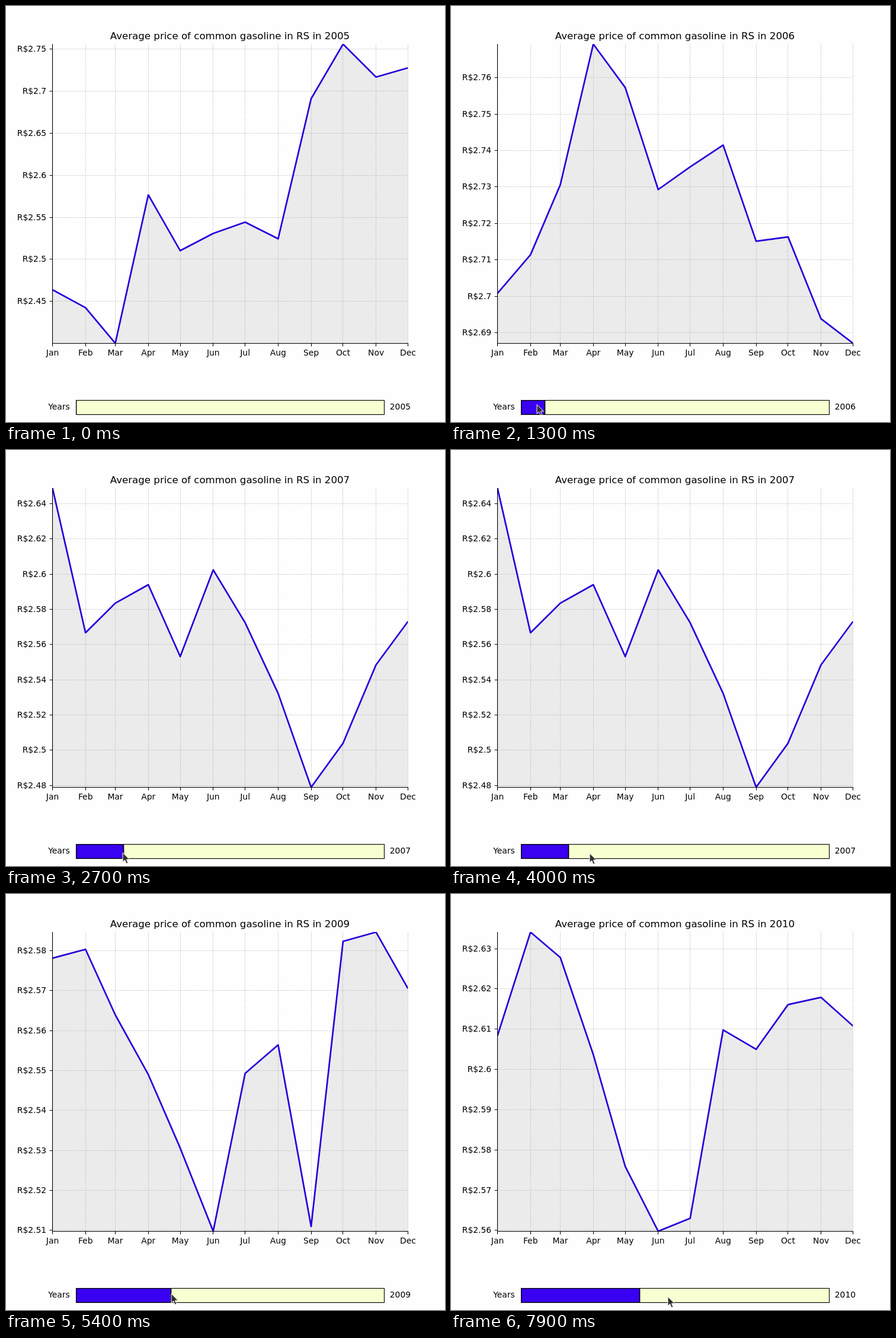
An HTML page that plays this animation: 741 by 701 pixels, repeating every 8 s.

```html
<!DOCTYPE html>
<html lang="en">
<head>
<meta charset="utf-8">
<title>Gasoline price by year</title>
<style>
html, body { margin: 0; width: 100%; height: 100%; overflow: hidden; background: #fefefe; }
svg { display: block; font: 13.89px "DejaVu Sans", sans-serif; }
.grid { stroke: #b0b0b0; stroke-width: 1.11; stroke-dasharray: 1.11 1.83; fill: none; }
.axis { stroke: #000; stroke-width: 1.11; fill: none; }
</style>
</head>
<body>
<svg width="741" height="701" viewBox="0 0 741 701">
  <clipPath id="plot"><rect x="78" y="64" width="600.5" height="504.5"/></clipPath>
  <clipPath id="track"><rect x="118" y="664" width="521" height="25"/></clipPath>
  <rect width="741" height="701" fill="#fefefe"/>
  <path id="area" fill="#ebebeb" clip-path="url(#plot)"/>
  <path id="grid" class="grid"/>
  <path id="line" fill="none" stroke="#2200dd" stroke-width="2.7" stroke-linejoin="round" clip-path="url(#plot)"/>
  <path id="axes" class="axis"/>
  <g id="months" text-anchor="middle"></g>
  <g id="prices" text-anchor="end"></g>
  <text id="title" x="378" y="56" font-size="16.62" text-anchor="middle"></text>
  <rect x="118.5" y="664.5" width="520" height="24" fill="#f8ffd0"/>
  <path id="fill" fill="#3900f2" stroke="#000" stroke-width="1.6" clip-path="url(#track)"/>
  <rect class="axis" x="118.5" y="664.5" width="520" height="24"/>
  <text x="107.8" y="680" text-anchor="end">Years</text>
  <text id="year" x="647.8" y="680"></text>
  <path id="cursor" d="M1 .6V16.2L4.6 12.9L7.2 19.1L9.9 17.9L7.4 12H12.5Z" fill="#2e2e2e" stroke="#fff"/>
</svg>
<script>
const el = id => document.getElementById(id);
const LOOP = 8000, STEP = 100, STEPS_PER_YEAR = 13.7, FIRST = 2005;
const LEFT = 78.5, WIDTH = 600, TOP = 64.3, BASE = 568.3;

const names = "Jan Feb Mar Apr May Jun Jul Aug Sep Oct Nov Dec".split(" ");
const day = m => Date.UTC(FIRST, m, 1) - Date.UTC(FIRST, 0, 1);
const xs = names.map((_, m) => LEFT + WIDTH * day(m) / day(11));
const snap = v => Math.floor(v) + 0.5;

// monthly prices in R$, one row per year
const prices = [
  [2.4638, 2.4426, 2.4003, 2.5766, 2.5103, 2.5308, 2.5442, 2.5244, 2.6909, 2.7557, 2.7166, 2.7275],
  [2.7008, 2.7114, 2.7306, 2.7692, 2.7573, 2.7293, 2.7355, 2.7415, 2.7151, 2.7163, 2.6938, 2.6871],
  [2.6488, 2.5667, 2.5835, 2.594, 2.5532, 2.6024, 2.5724, 2.5323, 2.479, 2.504, 2.5485, 2.5731],
  [2.5346, 2.4681, 2.551, 2.5636, 2.5633, 2.5742, 2.5955, 2.5923, 2.592, 2.5928, 2.5912, 2.5874],
  [2.5781, 2.5803, 2.5639, 2.549, 2.5306, 2.5098, 2.5493, 2.5564, 2.511, 2.5823, 2.5846, 2.5705],
  [2.6084, 2.6341, 2.6278, 2.6037, 2.5759, 2.5598, 2.563, 2.6098, 2.605, 2.6161, 2.6179, 2.6108]
];

// pointer moves: start time, steps, end x, end y, sag of the path
const start = { x: 103, y: 694 };
const moves = [
  [500, 6, 141, 668, -8],
  [1300, 1, 144, 671, 0],
  [1600, 6, 196, 678, 6],
  [3000, 2, 224, 682, 0],
  [3300, 5, 235, 679, 1],
  [4000, 1, 233, 679, 0],
  [4400, 3, 270, 675, 0],
  [4800, 2, 278, 673, 0],
  [5800, 4, 322, 678, 5],
  [7100, 1, 368, 679, 0],
  [7500, 1, 365, 678, 0]
];

const label = (x, y, s) => `<text x="${x}" y="${y}">${s}</text>`;

function drawChart(n) {
  const row = prices[n], low = Math.min(...row), high = Math.max(...row);
  const yOf = v => BASE - (v - low) / (high - low) * (BASE - TOP);
  const gap = [0.01, 0.02, 0.05].find(s => (high - low) / s < 9);
  const path = "M" + row.map((v, i) => `${xs[i]} ${yOf(v)}`).join("L");
  let grid = xs.map(x => `M${snap(x)} 568V64`).join("");
  let axes = "M78.5 64V569M78 568.5H679" + xs.map(x => `M${snap(x)} 568.5V573.4`).join("");
  let labels = "";
  for (let i = Math.ceil(low / gap); i * gap <= high; i++) {
    const y = snap(yOf(i * gap));
    grid += `M78 ${y}H678`;
    axes += `M78.5 ${y}H73.6`;
    labels += label(68.2, y + 4.5, "R$" + +(i * gap).toFixed(2));
  }
  el("line").setAttribute("d", path);
  el("area").setAttribute("d", path + `V${BASE}H${LEFT}Z`);
  el("grid").setAttribute("d", grid);
  el("axes").setAttribute("d", axes);
  el("fill").setAttribute("d", `M118.5 664.5h${40 * n}v24H118.5Z`);
  el("prices").innerHTML = labels;
  el("title").textContent = "Average price of common gasoline in RS in " + (FIRST + n);
  el("year").textContent = FIRST + n;
}

function drawCursor(t) {
  let { x, y } = start, sag = 0;
  for (const [at, steps, toX, toY, bend] of moves) {
    if (t < at) break;
    const p = Math.min(1, (Math.floor((t - at) / STEP) + 1) / steps);
    x += (toX - x) * p;
    y += (toY - y) * p;
    sag = bend * Math.sin(Math.PI * p);
  }
  el("cursor").style.display = t < moves[0][0] ? "none" : "";
  el("cursor").setAttribute("transform", `translate(${Math.round(x)} ${Math.round(y + sag)})`);
}

let shown = -1;
function frame() {
  const t = performance.now() % LOOP;
  const n = Math.ceil((Math.floor(t / STEP) + 1) / STEPS_PER_YEAR) - 1;
  if (n !== shown) drawChart(shown = n);
  drawCursor(t);
  requestAnimationFrame(frame);
}

el("months").innerHTML = names.map((m, i) => label(xs[i], 589, m)).join("");
frame();
</script>
</body>
</html>
```
